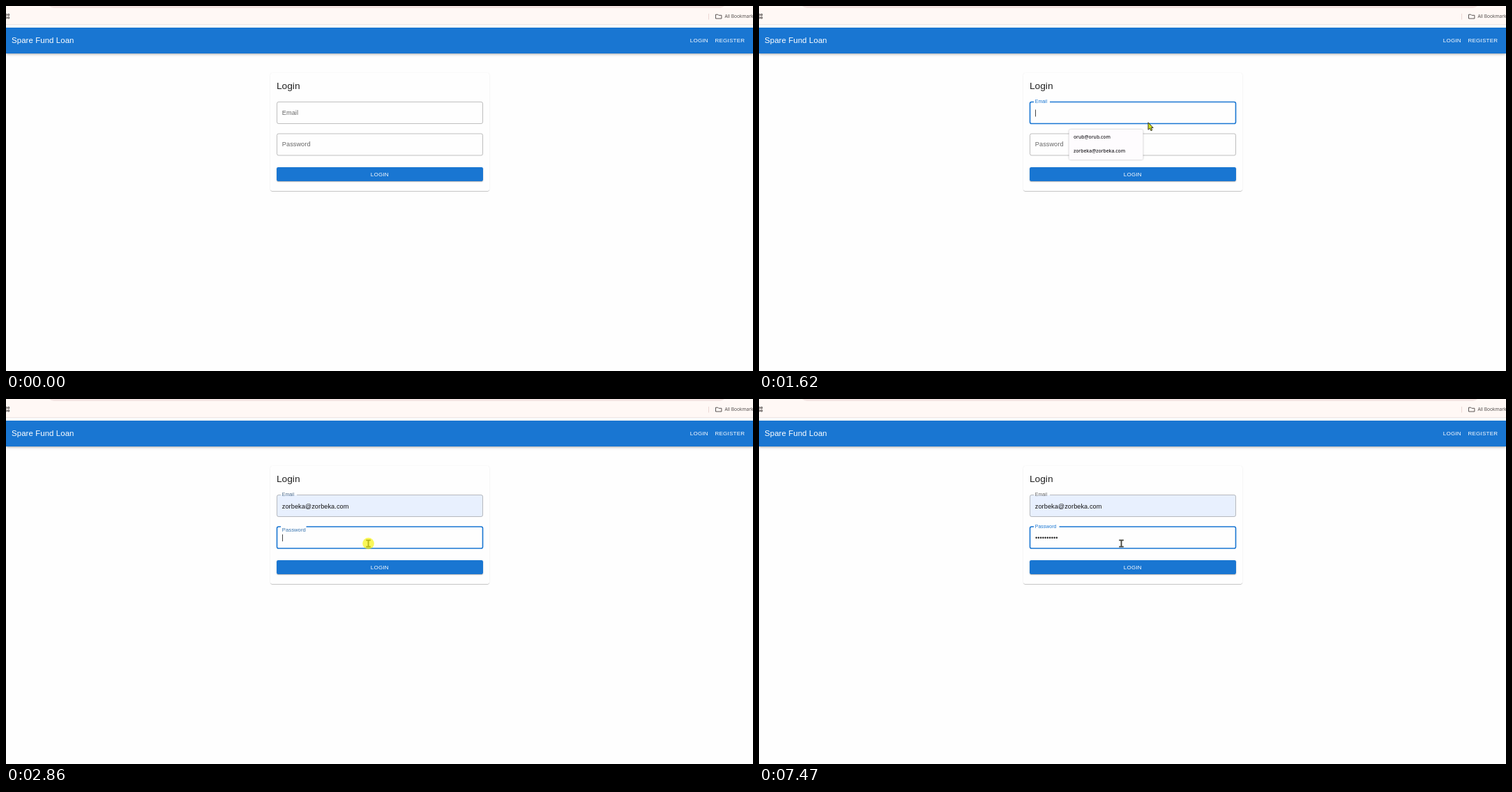
An HTML page that plays this animation: 1071x523 px, repeating every 8 s.

```html
<!DOCTYPE html>
<html lang="en">
<head>
<meta charset="utf-8">
<title>Login</title>
<style>
  html, body { margin: 0; width: 100%; height: 100%; overflow: hidden; background: #fefefe; }
  #stage { position: relative; width: 1071px; height: 523px; overflow: hidden; }
  #stage > * { position: absolute; }
  .chrome { left: 0; top: 0; width: 1071px; height: 26px; background: #fff8f5; border-bottom: 1px solid #efe5e2; }
  .address { left: 59px; top: -20px; width: 974px; height: 23px; border-radius: 10px; background: #f3e4e2; }
  .bar { left: 0; top: 31px; width: 1071px; height: 36.6px; background: #1976d2;
    box-shadow: 0 1.1px 2.3px -.6px rgba(0,0,0,.2), 0 2.3px 2.9px rgba(0,0,0,.14), 0 .6px 5.7px rgba(0,0,0,.12); }
  .card { left: 378.5px; top: 96px; width: 314.3px; height: 169.2px; border-radius: 2.3px; background: #fefefe;
    box-shadow: 0 1.1px .6px -.6px rgba(0,0,0,.2), 0 .6px .6px rgba(0,0,0,.14), 0 .6px 1.7px rgba(0,0,0,.12); }
  #button { left: 388px; top: 230.7px; width: 296px; height: 20.8px; border-radius: 2.3px;
    box-shadow: 0 1.7px .6px -1.1px rgba(0,0,0,.2), 0 1.1px 1.1px rgba(0,0,0,.14), 0 .6px 2.9px rgba(0,0,0,.12); }
  svg { left: 0; top: 0; }
  text { font: 9.14px "Liberation Sans", Arial, sans-serif; letter-spacing: .0094em; }
  .brand { font-size: 11.43px; letter-spacing: .0075em; fill: #fff; }
  .caps { font-size: 8px; letter-spacing: .0286em; fill: #fff; }
  .heading { font-size: 13.7px; letter-spacing: 0; fill: #212121; }
  .value { fill: #111; }
  .system, .value.preview { font: 600 6.75px "Open Sans", "Noto Sans", sans-serif; letter-spacing: 0; fill: #2a282c; }
  .value.preview { font-size: 6.95px; fill: #222; }
  .bookmarks { font: 6.6px "Open Sans", "Noto Sans", sans-serif; letter-spacing: 0; fill: #4a4443; }
  .icon { fill: none; stroke: #4a4443; stroke-width: .9; }
  .border { fill: none; }
  .caret { fill: #333; }
  #menu { filter: drop-shadow(0 .8px 1.3px rgba(0,0,0,.3)); }
</style>
</head>
<body>
<div id="stage">
  <div class="chrome"></div>
  <div class="address"></div>
  <div class="bar"></div>
  <div class="card"></div>
  <div id="button"></div>
  <svg width="1071" height="523" viewBox="0 0 1071 523">
    <path class="icon" d="M-1 11.6H1V13.6H-1ZM2.6 11.6H4.7V13.6H2.6ZM-1 15.8H1V17.9H-1ZM2.6 15.8H4.7V17.9H2.6Z"/>
    <path d="M1007.5 11V19.5" stroke="#ecd8d4"/>
    <path class="icon" d="M1017.5 18V12.2H1020.7L1021.8 13.3H1025.9V18Z"/>
    <text class="bookmarks" x="1030.5" y="17.2">All Bookmarks</text>
    <text class="brand" x="8" y="53.4">Spare Fund Loan</text>
    <text class="caps" x="980.8" y="52.3">LOGIN</text>
    <text class="caps" x="1016.5" y="52.3">REGISTER</text>
    <text class="heading" x="388" y="119">Login</text>
    <text class="caps" x="522.8" y="243.7">LOGIN</text>

    <rect id="autofill" x="388.5" y="137.5" width="295" height="31" rx="2.3" fill="#e8f0fe"/>
    <path id="emailBorder" class="border"/>
    <path id="passwordBorder" class="border"/>
    <text id="emailLabel">Email</text>
    <text id="passwordLabel">Password</text>
    <text id="emailValue" class="value" x="395.8" y="156.7"></text>
    <g id="dots" fill="#222"></g>
    <rect id="caret" class="caret" width=".9" height="10"/>

    <g id="menu">
      <rect x="444.5" y="177" width="106" height="43.3" rx="2.5" fill="#fefcfe"/>
      <rect id="row" x="446.8" width="101.2" height="20" rx="2.3" fill="#f0edf1"/>
      <text class="system" x="451" y="189.9">orub@orub.com</text>
      <text class="system" x="451" y="210.4">zorbeka@zorbeka.com</text>
      <path id="cross" d="M-2.3 -2.3L2.3 2.3M2.3 -2.3L-2.3 2.3" stroke="#333" stroke-width=".9"/>
    </g>

    <g id="cursor">
      <path id="arrow" d="M0 0V10.4L2.4 8.4L4 11.8L5.8 11L4.3 7.6H7.2Z" fill="#d0de1c" stroke="#222" stroke-width=".9" stroke-linejoin="round"/>
      <path id="beam" d="M-3.3 -4.6H3.3M-3.3 4.6H3.3M0 -4.6V4.6" fill="none" stroke="#42423a" stroke-width="1.8"/>
      <circle id="halo" r="8.3" fill="#f8f200"/>
    </g>
  </svg>
</div>
<script>
const LOOP = 8000;
const GREY = [102, 102, 102], BLUE = [25, 118, 210], DARK_BLUE = [21, 101, 192];
const CLICK = { email: 1330, choose: 2400, password: 2790 };
const MENU_OPEN = 1400;

// Bursts of movement: start, end, number of steps
const BURSTS = [[240, 1010, 12], [1080, 1140, 2], [1330, 2070, 12], [2270, 2600, 6], [2790, 3070, 5]];
// Pointer path: time, x, y
const PATH = [
  [240, 1018, 514], [1010, 565, 174], [1080, 560, 163], [1140, 559.5, 160], [1530, 559, 161],
  [1730, 556, 178], [1800, 549, 188], [1866, 547, 198.5], [1935, 545, 200], [2070, 538, 203.5],
  [2270, 533, 205], [2336, 528, 206.5], [2470, 520, 207], [2600, 519.5, 207]
];
const KEYS = [4120, 4410, 4590, 4860, 5060, 5190, 5450, 6320, 6720, 6930];
const CARET_OFF = [[3390, 3920], [6010, 6320], [7470, LOOP]];
const DOT_PITCH = 3.25;

const el = id => document.getElementById(id);
const clamp = v => Math.min(1, Math.max(0, v));
const mix = (a, b, k) => a + (b - a) * k;
const colour = (a, b, k) => `rgb(${a.map((v, i) => Math.round(mix(v, b[i], k)))})`;
const ease = u => 1 - (1 - clamp(u)) ** 2.5;
const within = (t, a, b) => t >= a && t < b;
const set = (id, attrs) => {
  for (const name in attrs) el(id).setAttribute(name, attrs[name]);
};
const show = (id, visible) => { el(id).style.display = visible ? '' : 'none'; };

for (let i = 0; i < KEYS.length; i++) {
  const dot = document.createElementNS('http://www.w3.org/2000/svg', 'circle');
  dot.setAttribute('cx', 397.6 + i * DOT_PITCH);
  dot.setAttribute('cy', 198.7);
  dot.setAttribute('r', 1.2);
  el('dots').append(dot);
}

// Holds the time between the discrete steps of each burst
function held(t) {
  const burst = BURSTS.filter(b => b[0] <= t).pop();
  if (!burst) return t;
  const [start, end, count] = burst;
  const step = (end - start) / (count - 1);
  return start + Math.min(count - 1, Math.floor((t - start + 8) / step)) * step;
}

function pointerAt(t) {
  const next = PATH.findIndex(p => p[0] > t);
  if (next < 0) return PATH[PATH.length - 1].slice(1);
  if (next === 0) return PATH[0].slice(1);
  const [t0, x0, y0] = PATH[next - 1], [t1, x1, y1] = PATH[next];
  const k = (t - t0) / (t1 - t0);
  return [mix(x0, x1, k), mix(y0, y1, k)];
}

function drawField(name, top, notchWidth, float, focus, focused, hovered) {
  const y = top + .5, gapEnd = 394 + notchWidth * clamp(float * 1.6);
  set(name + 'Border', {
    d: `M${gapEnd} ${y}H681.2q2.3 0 2.3 2.3v26.4q0 2.3 -2.3 2.3H390.8q-2.3 0 -2.3 -2.3v-26.4q0 -2.3 2.3 -2.3H394`,
    stroke: focused ? '#1976d2' : hovered ? '#333' : 'rgba(0,0,0,.25)',
    'stroke-width': focused ? 1.6 : 1
  });
  const label = el(name + 'Label');
  set(name + 'Label', {
    transform: `translate(395.8 ${mix(top + 18.8, top + 2.3, float)}) scale(${mix(1, .75, float)})`
  });
  label.style.fill = colour(GREY, BLUE, focus);
}

function draw(time) {
  const t = held(time);
  const [x, y] = pointerAt(t);
  const menuOpen = within(t, MENU_OPEN, CLICK.choose);
  const hovers = top => t >= 240 && !menuOpen && x > 388 && x < 684 && y > top && y < top + 32;
  const overEmail = hovers(137), overPassword = hovers(182.5);

  const emailFloat = ease((t - CLICK.email) / 200);
  const passwordFloat = ease((t - CLICK.password) / 200);
  drawField('email', 137, 23, emailFloat, emailFloat - passwordFloat,
    within(t, CLICK.email, CLICK.password), overEmail);
  drawField('password', 182.5, 36.5, passwordFloat, passwordFloat,
    t >= CLICK.password, overPassword);

  const buttonHover = clamp(Math.min((t - 860) / 100, (1140 - t) / 150));
  el('button').style.background = colour(BLUE, DARK_BLUE, buttonHover);

  // Suggestions and the value they preview
  const firstRow = within(t, 1725, 1860), secondRow = within(t, 1860, CLICK.choose);
  const chosen = t >= CLICK.choose;
  const value = firstRow ? 'orub@orub.com' : secondRow || chosen ? 'zorbeka@zorbeka.com' : '';
  el('emailValue').textContent = value;
  el('emailValue').classList.toggle('preview', !chosen);
  show('autofill', value);
  show('menu', menuOpen);
  show('row', firstRow || secondRow);
  show('cross', firstRow || secondRow);
  set('row', { y: firstRow ? 178 : 197.7 });
  set('cross', { transform: `translate(538 ${firstRow ? 187.5 : 207.9})` });

  // Typing
  const typed = KEYS.filter(k => k <= time).length;
  [...el('dots').children].forEach((dot, i) => { dot.style.display = i < typed ? '' : 'none'; });
  const inPassword = t >= CLICK.password;
  const blinkedOff = CARET_OFF.some(([a, b]) => within(time, a, b));
  show('caret', t >= CLICK.email && !(value && !chosen) && !blinkedOff);
  set('caret', {
    x: inPassword ? 396 + typed * DOT_PITCH : chosen ? 491 : 396,
    y: inPassword ? 194 : 148.5
  });

  // Pointer
  show('cursor', t >= 240);
  set('cursor', { transform: `translate(${x} ${y})` });
  show('beam', overEmail || overPassword);
  show('arrow', !(overEmail || overPassword));
  const halo = Object.values(CLICK).reduce((sum, c) =>
    sum + (t >= c ? clamp((200 - (t - c)) / 100) : 0), 0);
  set('halo', { opacity: .65 * clamp(halo) });
}

const begin = performance.now();
function tick() {
  draw((performance.now() - begin) % LOOP);
  requestAnimationFrame(tick);
}
tick();
</script>
</body>
</html>
```
